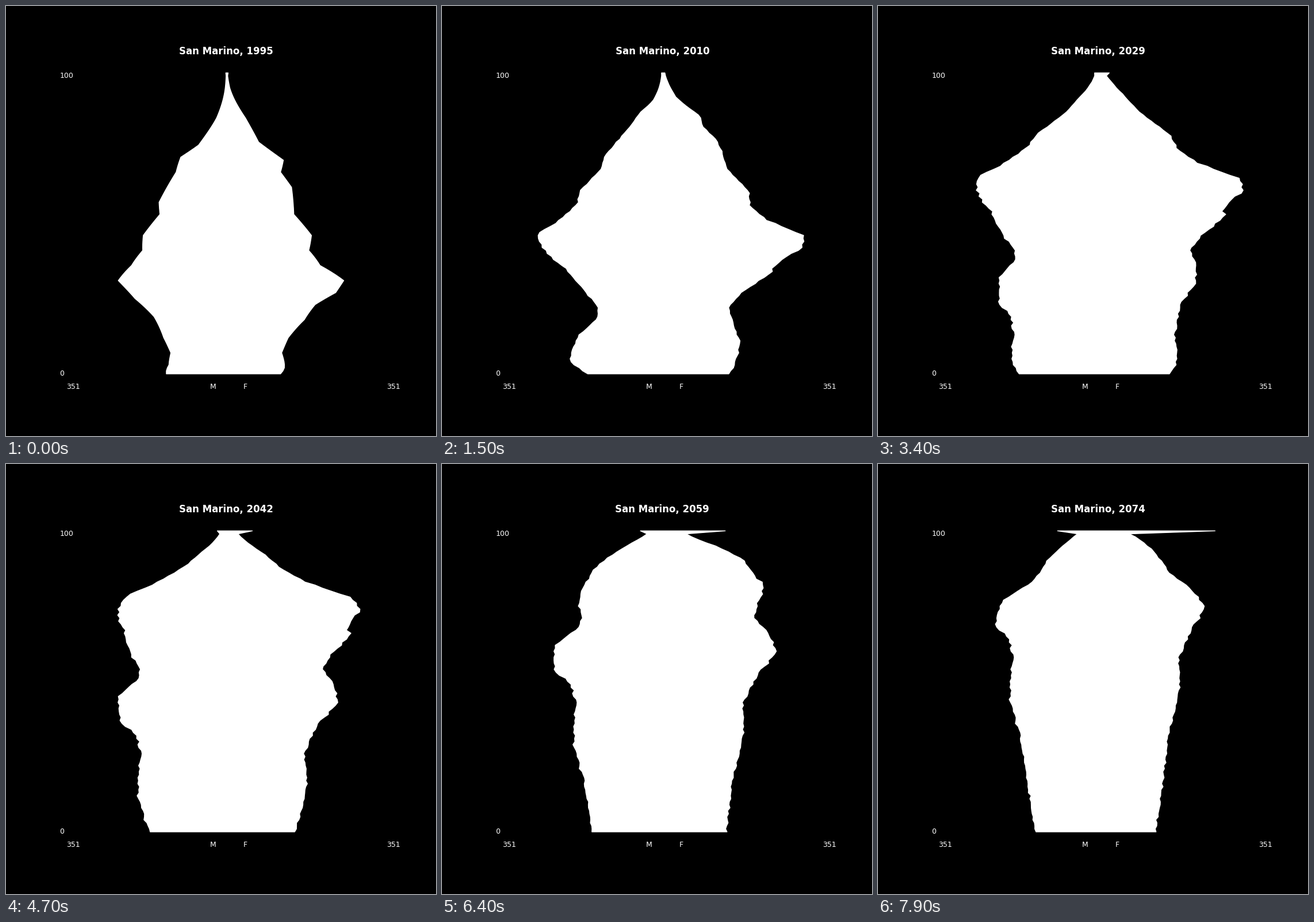
A matplotlib script for the animation above (8 s loop, 748 by 748 pixels).

```python
import numpy as np
import matplotlib.pyplot as plt
from matplotlib.animation import FuncAnimation

FIRST, LAST = 1995, 2074
AGES = np.arange(100)
BIRTHS = np.arange(FIRST - 99, LAST + 1)


def fade(x, middle, spread):
    """Smooth step from 1 down to 0."""
    return 1 / (1 + np.exp((x - middle) / spread))


class Side:
    """One half of the pyramid: birth cohorts that move in, grow old and die."""

    def __init__(self, seed, cohorts, newcomers, until, lifespan, gain, scale, oldest):
        years, sizes = zip(*cohorts)
        self.full = np.interp(BIRTHS, years, sizes)
        self.noise = np.random.default_rng(seed).normal(0, 0.009, len(BIRTHS))
        # share that moves in after birth, and the last birth years it holds for
        self.newcomers, self.until = newcomers, until
        # typical age at death, its yearly gain and its spread
        self.lifespan, self.gain, self.scale = lifespan, gain, scale
        self.oldest = oldest

    def widths(self, year):
        born = year - AGES
        i = born - BIRTHS[0]
        passed = year - FIRST

        missing = self.newcomers * fade(born, self.until, 6) * fade(AGES, 29, 7)
        infants = 0.12 * np.exp(-AGES / 3) * fade(born, 2034, 4)
        rough = 1 + self.noise[i] * min(1, passed / 20)

        mode = self.lifespan + self.gain * passed
        alive = np.exp(-np.exp((AGES - mode) / self.scale))

        first, last = self.oldest
        over_100 = first + (last - first) * (passed / (LAST - FIRST)) ** 3
        return np.append(self.full[i] * (1 - missing - infants) * rough * alive, over_100)


# key points: birth year and full cohort size in pixels
male = Side(
    3,
    [(1900, 30), (1910, 44), (1919, 70), (1923, 101), (1928, 101), (1938, 124),
     (1942, 121), (1949, 152), (1954, 157), (1959, 187), (1964, 230), (1970, 217),
     (1976, 189), (1983, 173), (1988, 154), (1992, 161), (1997, 194), (2002, 194),
     (2006, 186), (2010, 162), (2016, 151), (2030, 154), (2041, 137), (2074, 109)],
    newcomers=0.42, until=2001, lifespan=85.5, gain=0.11, scale=9.5, oldest=(1, 71))
female = Side(
    8,
    [(1900, 34), (1910, 59), (1918, 71), (1924, 112), (1928, 102), (1933, 119),
     (1942, 121), (1949, 155), (1954, 155), (1959, 187), (1964, 256), (1968, 260),
     (1972, 230), (1977, 221), (1983, 187), (1988, 172), (1993, 192), (1999, 204),
     (2006, 171), (2016, 141), (2026, 142), (2043, 121), (2074, 100)],
    newcomers=0.47, until=2006, lifespan=90, gain=0.075, scale=9, oldest=(3, 203))


plt.rcParams["font.family"] = "DejaVu Sans"
fig = plt.figure(figsize=(7.48, 7.48), dpi=100, facecolor="black")
ax = fig.add_axes([0.125, 0.1095, 0.775, 0.77])
ax.set_xlim(-289.85, 289.85)
ax.set_ylim(-5, 105)
ax.axis("off")


def label(x, y, text, size=9, **style):
    return ax.text(x, y, text, transform=ax.transAxes, color="white",
                   fontsize=size, **style)


label(0, 0.94, "100")
label(0, 0.04, "0")
label(0.02, 0, "351")
label(0.98, 0, "351")
label(0.45, 0, "M")
label(0.55, 0, "F")
title = label(0.5, 1.01, "", 12, weight="bold", ha="center")

LEVELS = np.arange(101)
OUTLINE_Y = np.concatenate([LEVELS, LEVELS[::-1]])
shape, = ax.fill([0, 1, 1], [0, 0, 1], facecolor="white", edgecolor="white",
                 linewidth=1, joinstyle="round")


def draw(frame):
    year = FIRST + frame
    x = np.concatenate([-male.widths(year), female.widths(year)[::-1]])
    shape.set_xy(np.column_stack([x, OUTLINE_Y]))
    title.set_text(f"San Marino, {year}")
    return shape, title


anim = FuncAnimation(fig, draw, frames=LAST - FIRST + 1, interval=100,
                     repeat=True, repeat_delay=0)
plt.show()
```
